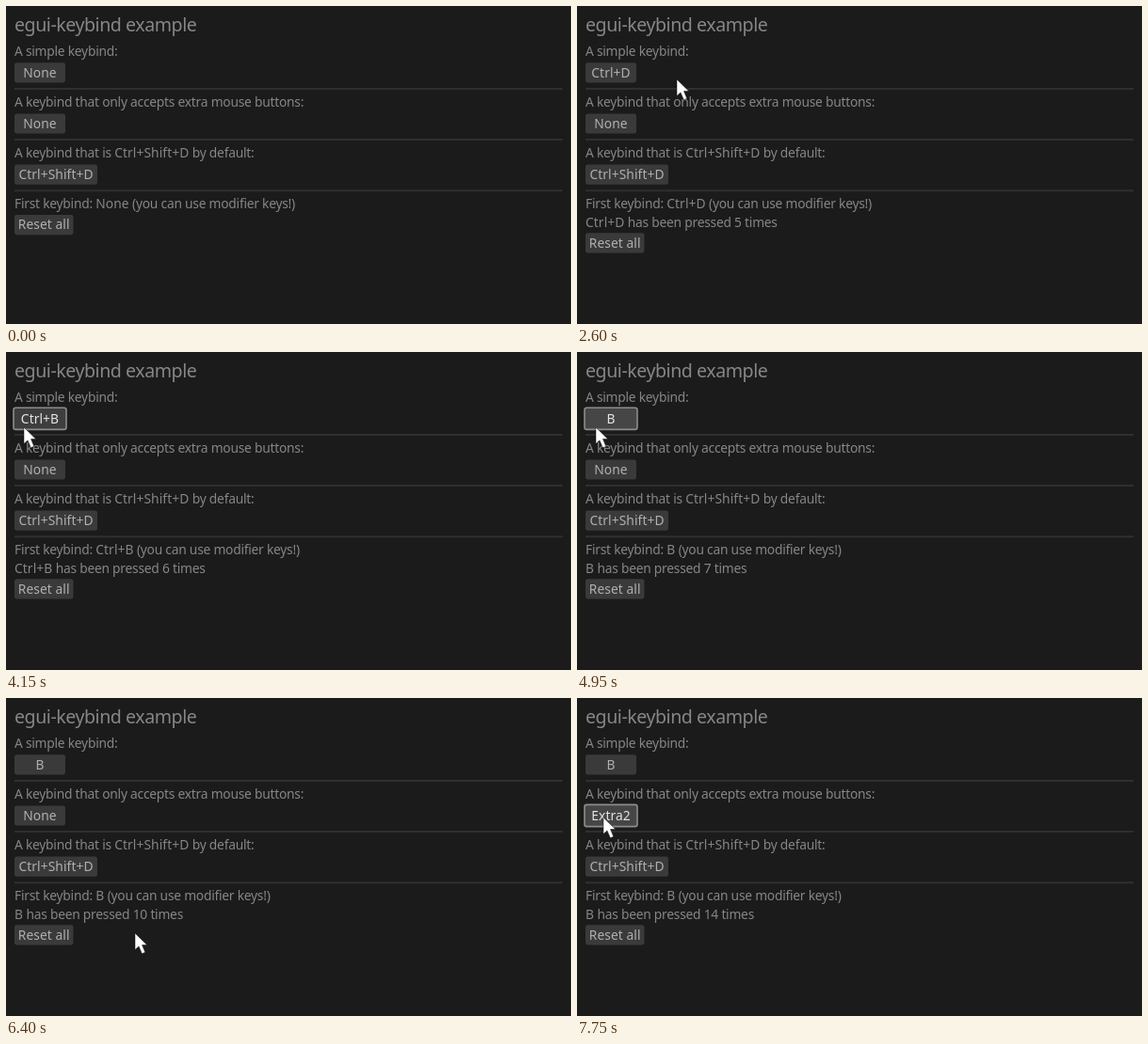
An HTML page that plays this animation: 600 px wide and 338 px high, repeating every 8 s.

```html
<!DOCTYPE html>
<html lang="en">
<head>
<meta charset="utf-8">
<title>Keybind example</title>
<style>
  html, body { margin: 0; width: 100%; height: 100%; overflow: hidden; background: #1b1b1b; }
  svg { display: block; width: 100vw; height: 100vh; }
  text { font: 13.8px "Noto Sans", "Open Sans", sans-serif; letter-spacing: -.24px; fill: #868686; white-space: pre; }
  .heading { font-size: 19.6px; letter-spacing: -.46px; }
  .key, .button text { letter-spacing: .08px; }
  .line { stroke: #2f2f2f; stroke-width: 2; }
  .button rect { fill: #3a3a3a; }
  .button text { fill: #b0b0b0; text-anchor: middle; }
  .hover rect { fill: #464646; }
  .active rect { fill: #3e3e3e; }
  .expect rect { fill: #005c80; }
  .hover rect, .active rect, .expect rect { stroke: #8c8c8c; stroke-width: 1.6; }
  .hover text, .active text { fill: #e4e4e4; }
  .expect text { fill: #c0deff; }
  #cursor { fill: #fff; stroke: #111; stroke-width: .5; stroke-linejoin: round; }
</style>
</head>
<body>
<svg viewBox="0 0 600 338" preserveAspectRatio="none">
  <text class="heading" x="9" y="27">egui-keybind example</text>
  <text x="9" y="52.8">A simple keybind:</text>
  <g id="simple"><rect x="9" y="60.2" width="54" height="21.2" rx="2.4"/><text x="36" y="75.8"></text></g>
  <path class="line" d="M9 87.9H591M9 142.1H591M9 196.3H591"/>
  <text x="9" y="107.1">A keybind that only accepts extra mouse buttons:</text>
  <g id="mouse"><rect x="9" y="114.4" width="54" height="21.2" rx="2.4"/><text x="36" y="130"></text></g>
  <text x="9" y="161.2">A keybind that is <tspan class="key">Ctrl+Shift+D</tspan> by default:</text>
  <g class="button"><rect x="9" y="168.6" width="88" height="21.2" rx="2.4"/><text x="53" y="184.2">Ctrl+Shift+D</text></g>
  <text x="9" y="215.3">First keybind: <tspan class="key name"></tspan> (you can use modifier keys!)</text>
  <text id="presses" x="9" y="234.7"><tspan class="key name"></tspan> has been pressed <tspan id="count"></tspan> times</text>
  <g id="reset" class="button"><rect x="9" y="222" width="62.5" height="21.2" rx="2.4"/><text x="40.2" y="237.4">Reset all</text></g>
  <path id="cursor" d="M0 0V17.6L4 13.9L7.4 21.8L10.8 20.3L7.5 12.6H12.8Z"/>
</svg>
<script>
const LOOP = 8000, STEP = 50;
const el = id => document.getElementById(id);
const show = (id, on) => el(id).setAttribute("visibility", on ? "visible" : "hidden");

// Step tracks: [start time, value]
const binding = [[0, "None"], [800, "Ctrl+D"], [3600, "Ctrl+B"], [4600, "B"]];
const mouseBinding = [[0, "None"], [7600, "Extra2"]];
const simpleState = [
  [0, ""], [650, "expect"], [800, "hover"], [1250, ""], [2750, "hover"], [3100, "active"],
  [3250, "expect"], [3600, "hover"], [4150, "active"], [4300, "expect"], [4600, "hover"], [5000, ""]
];
const mouseState = [[0, ""], [7250, "hover"], [7350, "active"], [7500, "expect"], [7600, "active"], [7750, "hover"]];
const pressTimes = [800, 1950, 2150, 2300, 2450, 3600, 4600, 6100, 6250, 6400, 6550, 6700, 6850, 7000];

// Pointer path: [time, x, y]
const pointer = [
  [850, 38, 65], [1150, 53, 68], [1300, 112, 79], [2450, 112, 79], [2600, 106, 78],
  [2800, 44, 78], [3000, 44, 78], [3200, 19, 80], [4900, 19, 80], [4950, 20, 80],
  [5300, 171, 262], [5550, 137, 250], [6400, 137, 250], [6550, 137, 243],
  [6800, 128, 228], [7300, 28, 127], [LOOP, 28, 127]
];

const valueAt = (track, t) => track.findLast(([start]) => start <= t)[1];

function pointerAt(t) {
  const i = pointer.findIndex(([time]) => time > t);
  const [t0, x0, y0] = pointer[i - 1], [t1, x1, y1] = pointer[i];
  const p = (t - t0) / (t1 - t0), k = p * p * (3 - 2 * p);
  return [x0 + (x1 - x0) * k, y0 + (y1 - y0) * k];
}

function setButton(id, top, label, state) {
  const button = el(id), rect = button.querySelector("rect"), grow = state ? 1 : 0;
  button.setAttribute("class", "button " + state);
  button.querySelector("text").textContent = label;
  rect.setAttribute("x", 9 - grow);
  rect.setAttribute("y", top - grow);
  rect.setAttribute("width", 54 + 2 * grow);
  rect.setAttribute("height", 21.2 + 2 * grow);
}

function draw(t) {
  const key = valueAt(binding, t), bound = key !== "None";
  setButton("simple", 60.2, key, valueAt(simpleState, t));
  setButton("mouse", 114.4, valueAt(mouseBinding, t), valueAt(mouseState, t));
  document.querySelectorAll(".name").forEach(name => name.textContent = key);
  el("count").textContent = pressTimes.filter(time => time <= t).length;
  show("presses", bound);
  el("reset").setAttribute("transform", `translate(0 ${bound ? 19.2 : 0})`);
  const visible = t >= pointer[0][0];
  show("cursor", visible);
  if (visible) el("cursor").setAttribute("transform", `translate(${pointerAt(t)})`);
}

const origin = performance.now();
let last = -1;
function tick() {
  const elapsed = (performance.now() - origin) % LOOP;
  const t = Math.floor(elapsed / STEP) * STEP;
  if (t !== last) draw(last = t);
  requestAnimationFrame(tick);
}
tick();
</script>
</body>
</html>
```
